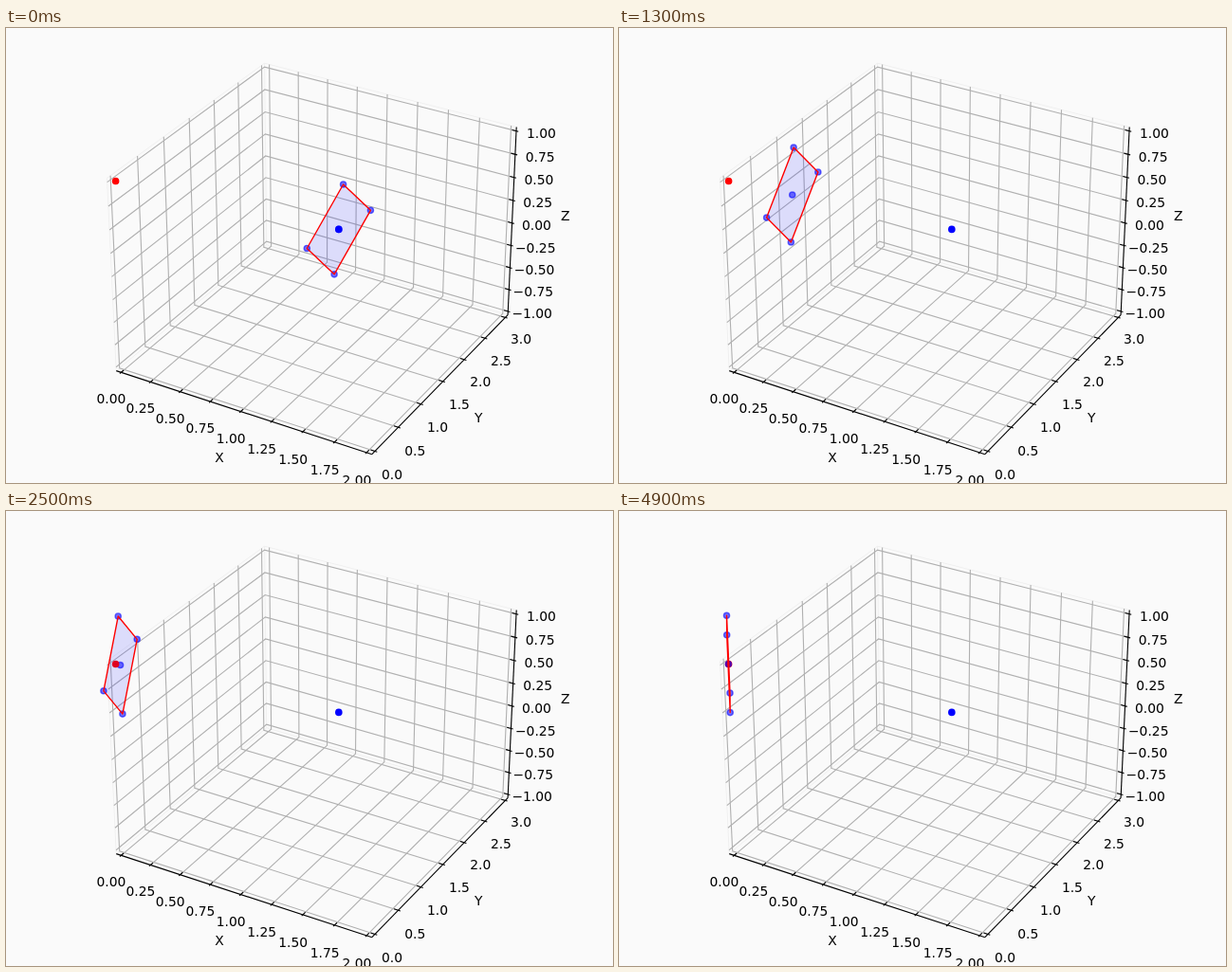
An HTML page that plays this animation: 640 px wide and 480 px high, repeating every 5 s.

```html
<!DOCTYPE html>
<html lang="en">
<head>
<meta charset="utf-8">
<title>Moving plane in 3D axes</title>
<style>
  html, body { margin: 0; width: 100%; height: 100%; overflow: hidden; background: #fafafa; }
  svg { display: block; width: 640px; height: 480px; }
  path { fill: none; }
  .pane { stroke: #f0f0f0; stroke-width: 1; }
  .grid { stroke: #b0b0b0; stroke-width: 1.11; }
  .axis { stroke: #000; stroke-width: 1.11; }
  .face { fill: rgba(0, 0, 255, .12); stroke: #f00; stroke-width: 1.39; stroke-linejoin: round; }
  .dot { stroke-width: 1.39; }
  .blue { fill: #00f; stroke: #00f; }
  .red { fill: #f00; stroke: #f00; }
  .soft { fill-opacity: .55; stroke-opacity: .55; }
  text { font: 13.89px "DejaVu Sans", sans-serif; text-anchor: middle; }
</style>
</head>
<body>
<svg id="stage" viewBox="0 0 640 480"></svg>
<script>
const stage = document.getElementById('stage');

// ---- perspective camera: elevation 30, azimuth -60, distance 10 ----
const MIN = [0, 0, -1], MAX = [2, 3, 1], BOX = [8 / 7, 8 / 7, 6 / 7];
const SCALE = 480 / 0.185, C = Math.sqrt(3) / 2;

function project(p) {
  const [a, b, c] = p.map((v, i) => ((v - MIN[i]) / (MAX[i] - MIN[i]) - 0.5) * BOX[i]);
  const depth = 10 - (C / 2 * a - 0.75 * b + 0.5 * c);
  const x = (C * a + 0.5 * b) / depth;
  const y = (-0.25 * a + C / 2 * b + C * c) / depth;
  return [80 + (x + 0.095) * SCALE, 480 - (y + 0.095) * SCALE];
}

// ---- drawing helpers ----
function add(tag, cls, attrs = {}) {
  const el = document.createElementNS('http://www.w3.org/2000/svg', tag);
  if (cls) el.setAttribute('class', cls);
  for (const k in attrs) el.setAttribute(k, attrs[k]);
  return stage.appendChild(el);
}
const trace = pts => 'M' + pts.map(p => p[0].toFixed(2) + ' ' + p[1].toFixed(2)).join('L');
const line = (cls, ...pts) => add('path', cls, { d: trace(pts.map(project)) });
const dot = (cls, [x, y]) => add('circle', 'dot ' + cls, { r: 3.1, cx: x, cy: y });

function label(str, p, drop) {
  const [x, y] = project(p);
  add('text', '', { x: x.toFixed(2), y: Math.round(y + drop) }).textContent = str;
}
const number = (v, digits) => v.toFixed(digits).replace('-', '\u2212');

// ---- axes ----
const step = MAX.map((v, i) => (v - MIN[i]) / 12);
const [x0, y0, z0] = MIN.map((v, i) => v - step[i] / 4);
const [x1, y1, z1] = MAX.map((v, i) => v + step[i] / 4);

line('pane', [x0, y0, z0], [x0, y0, z1], [x0, y1, z1], [x1, y1, z1], [x1, y1, z0], [x0, y1, z0], [x0, y0, z0]);
line('pane', [x0, y1, z0], [x0, y1, z1]);
line('pane', [x0, y0, z0], [x1, y0, z0], [x1, y1, z0]);

const AXES = [
  { name: 'X', gap: 0.25, digits: 2, dir: 1, side: -1,
    edge: v => [v, y0, z0], grid: v => [[v, y0, z0], [v, y1, z0], [v, y1, z1]], out: [0, -1, -1] },
  { name: 'Y', gap: 0.5, digits: 1, dir: 0, side: 1,
    edge: v => [x1, v, z0], grid: v => [[x1, v, z0], [x0, v, z0], [x0, v, z1]], out: [1, 0, -1] },
  { name: 'Z', gap: 0.25, digits: 2, dir: 0, side: 1,
    edge: v => [x1, y1, v], grid: v => [[x0, y0, v], [x0, y1, v], [x1, y1, v]], out: [1, 1, 0] }
];
const ticks = (ax, i) =>
  Array.from({ length: Math.round((MAX[i] - MIN[i]) / ax.gap) + 1 }, (_, k) => MIN[i] + k * ax.gap);
const away = (p, out, f) => p.map((v, i) => v + out[i] * f * step[i]);

AXES.forEach((ax, i) => ticks(ax, i).forEach(v => line('grid', ...ax.grid(v))));

AXES.forEach((ax, i) => {
  const lo = [x0, y0, z0][i], hi = [x1, y1, z1][i];
  line('axis', ax.edge(lo), ax.edge(hi));
  const dir = [0, 0, 0];
  dir[ax.dir] = ax.side;
  for (const v of ticks(ax, i)) {
    const p = ax.edge(v);
    line('axis', away(p, dir, -0.2), away(p, dir, 0.1));
    label(number(v, ax.digits), away(p, ax.out, 0.7986), 10.9);
  }
  label(ax.name, away(ax.edge((lo + hi) / 2), ax.out, 1.736), 4.4);
});

// ---- moving plane ----
const START = [1, 2, 0], GOAL = [0, 0, 1];

dot('blue', project(START));
const goal = dot('red', project(GOAL));
const centre = dot('blue soft', [0, 0]);
const corners = [0, 1, 2, 3].map(() => dot('blue soft', [0, 0]));
const face = add('path', 'face');

// Distance left to the goal: a slightly underdamped spring.
function rest(n) {
  const s = 0.155, w = 0.086;
  return Math.exp(-s * n) * (Math.cos(w * n) + s / w * Math.sin(w * n));
}

// Smooth curve through values at the knots.
const KNOTS = [0, 9, 17, 25, 33, 41, 49];
function curve(vals) {
  const last = KNOTS.length - 1;
  const chord = i => (vals[i + 1] - vals[i]) / (KNOTS[i + 1] - KNOTS[i]);
  const m = vals.map((_, i) => {
    if (i === 0 || i === last) return 0;
    const a = KNOTS[i] - KNOTS[i - 1], b = KNOTS[i + 1] - KNOTS[i];
    return (chord(i - 1) * b + chord(i) * a) / (a + b);
  });
  m[0] = 2 * chord(0) - m[1];
  m[last] = 2 * chord(last - 1) - m[last - 1];
  return n => {
    let i = 0;
    while (i < last - 1 && n > KNOTS[i + 1]) i++;
    const h = KNOTS[i + 1] - KNOTS[i], t = (n - KNOTS[i]) / h, r = 1 - t;
    return vals[i] * (1 + 2 * t) * r * r + m[i] * h * t * r * r
         + vals[i + 1] * t * t * (3 - 2 * t) - m[i + 1] * h * t * t * r;
  };
}
const shortX = n => 28.8 - 5.45 * n / 49 - 23.15 * (n / 49) ** 2;
const shortY = n => 27.4 - 5.2 * n / 49 - 1.7 * (n / 49) ** 2;
const longX = curve([38.3, 32.5, 24.1, 15.3, 7.5, 1.5, -3.5]);
const longY = curve([67.5, 71.9, 75.9, 78.8, 80.3, 81.5, 81.8]);

function place(el, [x, y]) {
  el.setAttribute('cx', x.toFixed(2));
  el.setAttribute('cy', y.toFixed(2));
}

function draw(n) {
  const left = rest(n);
  const c = project(GOAL.map((g, i) => g + (START[i] - g) * left));
  const sx = shortX(n) / 2, sy = shortY(n) / 2, lx = longX(n) / 2, ly = -longY(n) / 2;
  const pts = [[-1, 1], [1, 1], [1, -1], [-1, -1]]
    .map(([s, l]) => [c[0] + s * sx + l * lx, c[1] + s * sy + l * ly]);
  place(centre, c);
  pts.forEach((p, i) => place(corners[i], p));
  face.setAttribute('d', trace(pts) + 'Z');
  // the farther of the two dots is painted first
  if (left > 0) stage.insertBefore(centre, goal);
  else stage.insertBefore(goal, centre);
}

const began = performance.now();
let shown = -1;
function tick() {
  const n = Math.floor((performance.now() - began) % 5000 / 100);
  if (n !== shown) draw(shown = n);
  requestAnimationFrame(tick);
}
tick();
</script>
</body>
</html>
```
